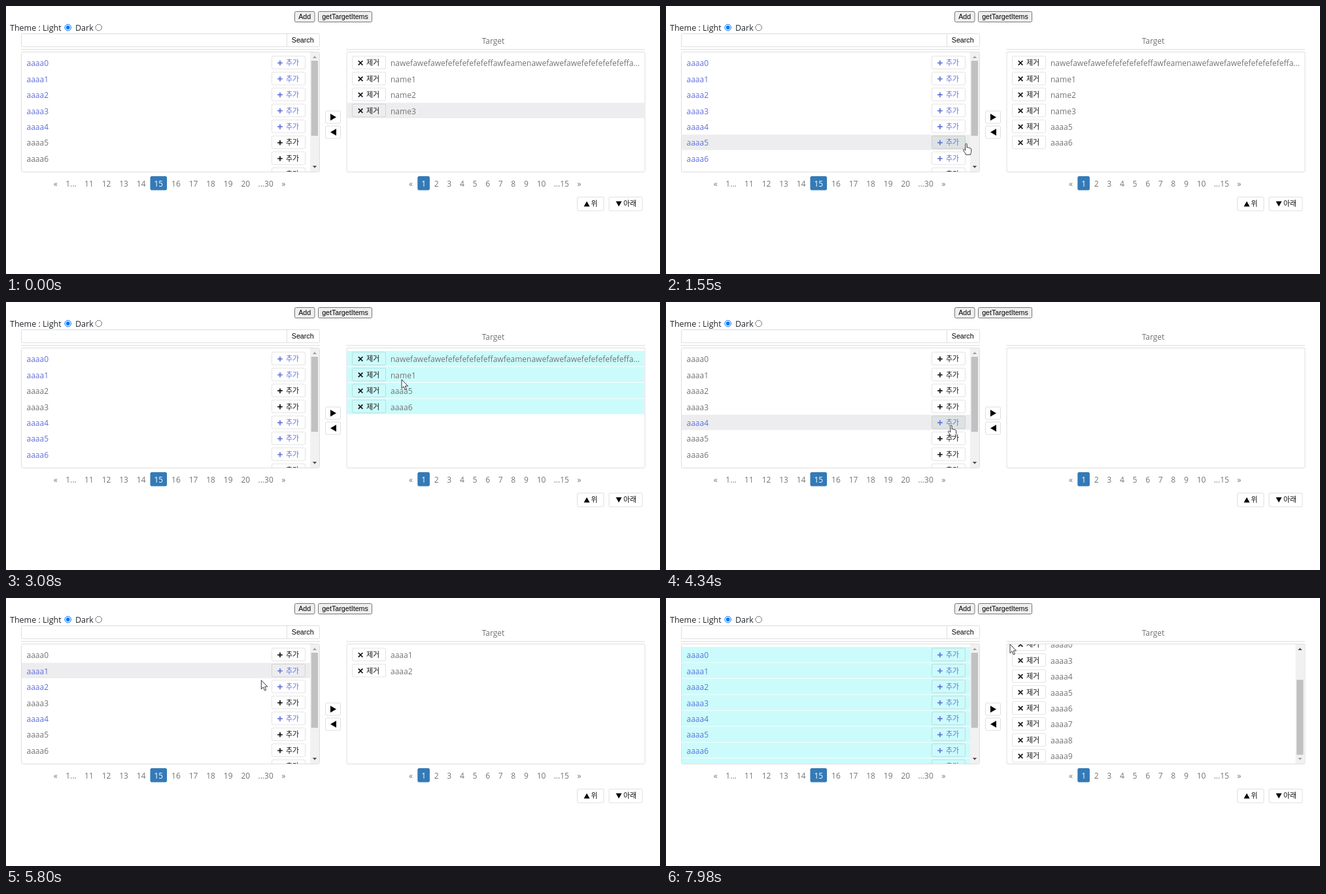
Write an HTML page that moves like this. It is 1000 px wide and 411 px high and loops after 8000 ms.

```html
<!DOCTYPE html>
<html lang="ko">
<head>
<meta charset="utf-8">
<title>Transfer list</title>
<style>
html, body { margin: 0; height: 100%; overflow: hidden; background: #fff; }
svg { display: block; }
#stage { width: 100vw; height: 100vh; }
text { font: 12px 'Open Sans', 'Noto Sans', sans-serif; fill: #747474; white-space: pre; }
.theme { font-size: 12.5px; fill: #212529; }
.ui { font: 10.7px 'Liberation Sans', Arial, sans-serif; fill: #000; }
.ko { font: 300 11px 'Noto Sans CJK KR', 'Noto Sans CJK', sans-serif; fill: #111; }
.mid { text-anchor: middle; }
.on { fill: #fff; }
.box { fill: none; stroke: #dedede; }
.icon { fill: none; stroke: #111; stroke-width: 1.7; }
.added text { fill: #6072da; }
.added .icon { stroke: #6072da; }
</style>
</head>
<body>
<svg id="stage" viewBox="0 0 1000 411">
  <g id="fixed"></g>
  <svg id="left" x="24" y="71" width="455" height="183" viewBox="24 71 455 183"></svg>
  <svg id="right" x="521" y="71" width="455" height="183" viewBox="521 71 455 183"></svg>
  <path id="cursor" fill="#fff" stroke="#222" stroke-width=".9" stroke-linejoin="round"/>
</svg>
<script>
const $ = id => document.getElementById(id);
const LOOP = 8000, GLIDE = 350, REACT = 120;
const TOP = 75, PITCH = 24.45, VISIBLE = 7.45;
const ARROW = 'M0 0v13.5l3-2.9 2.2 5.2 2.2-.9-2.1-5h4.2z';
const HAND = 'M-1.2 1.2c0-1.6 2.4-1.6 2.4 0v5c.6-.9 2.2-.6 2.3.5.7-.7 2-.4 2.2.6' +
  '.8-.5 2 0 2 1.2v4c0 1.5-1 2.3-1 4.5h-7c-.5-2-3-4.5-4-6.5-.8-1.5.9-2.3 1.9-1.2l1.2 1.3z';
const LONG = 'nawefawefawefefefefefefeffawfeamenawefawefawefefefefefefeffa...';

const upTo = n => [...Array(n).keys()];
const nameOf = id => 'aaaa' + id;

// What a click does to the lists
const add = id => s => { s.added.add(id); s.target.push({ id, name: nameOf(id) }); };
const remove = row => s => s.added.delete(s.target.splice(row, 1)[0].id);
const pick = side => s => { s.picked = side; };
const addAll = s => upTo(10).filter(id => !s.target.some(item => item.id === id)).forEach(id => add(id)(s));
const removeAll = s => { while (s.target.length) remove(0)(s); s.picked = ''; };

// Pointer stops: arrival time, x, y and the click made there
const STOPS = [
  [0, 640, 162],
  [720, 438, 206],
  [950, 438, 206, add(5)],
  [1230, 440, 231, add(6)],
  [1490, 459, 211],
  [2070, 563, 155, remove(3)],
  [2370, 563, 133, remove(2)],
  [2960, 605, 119, pick('right')],
  [3850, 498, 190, removeAll],
  [4340, 436, 189],
  [4710, 432, 108, add(1)],
  [5090, 431, 129],
  [5310, 431, 135, add(2)],
  [5820, 390, 126, pick('left')],
  [6710, 498, 172, addAll],
  [7980, 526, 71]];

function stateAt(t) {
  const names = [LONG, 'name1', 'name2', 'name3'];
  const s = { added: new Set(upTo(5)), target: names.map((name, id) => ({ id, name })), picked: '' };
  for (const [time, , , click] of STOPS) if (click && time + REACT <= t) click(s);
  return s;
}

function pointerAt(t) {
  const i = STOPS.findIndex(stop => stop[0] > t);
  if (i < 0) return STOPS.at(-1).slice(1, 3);
  const [t0, x0, y0] = STOPS[i - 1], [t1, x1, y1] = STOPS[i];
  const k = Math.max(0, 1 - (t1 - t) / Math.min(GLIDE, t1 - t0));
  const ease = k * k * (3 - 2 * k);
  return [x0 + (x1 - x0) * ease, y0 + (y1 - y0) * ease];
}

const text = (x, y, s, cls = '') => `<text x="${x}" y="${y}" class="${cls}">${s}</text>`;
const rect = (x, y, w, h, attrs) => `<rect x="${x}" y="${y}" width="${w}" height="${h}" ${attrs}/>`;
const box = (x, y, w, h) => rect(x + .5, y + .5, w, h, 'rx="2" class="box"');
const shape = (d, fill = '#000') => `<path d="${d}" fill="${fill}"/>`;

function pager(x, labels, current) {
  return labels.map(label => {
    const s = String(label), dots = s.split('.').length - 1;
    const w = 12.6 + 7 * (s.length - dots) + 2.8 * dots, on = s === current;
    x += w;
    return (on ? rect(x - w + .5, 261, w - 1, 21.5, 'rx="2.5" fill="#337ab7"') : '') +
      text(x - w / 2, 276.5, s, on ? 'mid on' : 'mid');
  }).join('');
}

function drawFixed() {
  const gray = 'rx="2" fill="#efefef" stroke="#767676"';
  const radio = (x, color) => `<circle cx="${x}" cy="33" r="4.8" fill="#fff" stroke="${color}"/>`;
  $('fixed').innerHTML =
    rect(441.5, 8.5, 30.5, 16, gray) + text(456.7, 20.3, 'Add', 'ui mid') +
    rect(477.5, 8.5, 82, 16, gray) + text(518.5, 20.3, 'getTargetItems', 'ui mid') +
    text(6, 38, 'Theme : Light', 'theme') + text(106, 38, 'Dark', 'theme') +
    radio(94.7, '#0075ff') + '<circle cx="94.7" cy="33" r="3" fill="#0075ff"/>' + radio(141.7, '#767676') +
    box(23, 42, 456, 20) + '<path d="M429.5 42v20M23 66.5h457M520 66.5h457" class="box"/>' +
    text(453.7, 56, 'Search', 'ui mid') + text(745, 57.5, 'Target', 'mid') +
    box(23, 70, 456, 184) + box(520.5, 70, 456, 184) +
    box(488, 160.5, 23, 19) + box(488, 183.5, 23, 19) +
    shape('M496 165.2l9 5.3-9 5.3zM505 188.2l-9 5.3 9 5.3z') +
    pager(66, ['«', '1...', ...upTo(10).map(i => i + 11), '...30', '»'], '15') +
    pager(609.2, ['«', ...upTo(10).map(i => i + 1), '...15', '»'], '1') +
    box(873, 292.5, 40.5, 21) + shape('M883.5 307.5h9l-4.5-8z') + text(894.5, 307.3, '위', 'ko') +
    box(921.5, 292.5, 51, 21) + shape('M932.5 299.5h9l-4.5 8z') + text(944, 307.3, '아래', 'ko');
}

function scrollbar(x, thumbY, atTop) {
  const dim = '#a3a3a3', dark = '#505050';
  return rect(x, 71, 14, 183, 'fill="#f1f1f1"') + rect(x + 1.7, thumbY, 10.3, 115, 'fill="#c1c1c1"') +
    shape(`M${x + 3.8} 80h6.4l-3.2-3.6z`, atTop ? dim : dark) +
    shape(`M${x + 3.8} 245h6.4l-3.2 3.6z`, atTop ? dark : dim);
}

const SOURCE = { x: 24, end: 465, button: 406, label: 31.5, word: 428, caption: '추가', icon: 'M415.2 87.3h7.6M419 83.5v7.6' };
const TARGET = { x: 521, end: 977, button: 529, label: 588, word: 551, caption: '제거', icon: 'M538.8 84l6.6 6.6m0-6.6l-6.6 6.6' };

const within = (v, a, b) => v >= a && v <= b;
const rowAt = y => Math.floor((y - TOP) / PITCH);

function row(side, i, name, added, picked, [x, y], scroll = 0) {
  const b = side.button;
  const hover = within(x, side.x, side.end) && rowAt(y - 6) === i;
  const pressed = hover && !picked && rowAt(y) === i && within(x, b, b + 54);
  const fill = picked ? '#ccfbfb' : hover ? '#ededef' : 'none';
  return `<g transform="translate(0 ${i * PITCH - scroll})" class="${added ? 'added' : ''}">` +
    rect(side.x, TOP, side.end - side.x, 23.6, `fill="${fill}"`) + text(side.label, 92.2, name) +
    rect(b + .5, 77, 51, 19.5, `rx="2" stroke="#000" stroke-opacity=".11" fill="${pressed ? '#dde2e3' : 'none'}"`) +
    `<path class="icon" d="${side.icon}"/>` + text(side.word, 91.2, side.caption, 'ko') + '</g>';
}

function draw(t) {
  const { added, target, picked } = stateAt(t);
  const pointer = pointerAt(t), [x, y] = pointer;
  const scroll = Math.max(0, target.length - VISIBLE) * PITCH + (target.length > VISIBLE ? 2.5 : 0);

  $('left').innerHTML = upTo(8).map(i =>
    row(SOURCE, i, nameOf(i), added.has(i), picked === 'left', pointer)).join('') + scrollbar(465, 84, true);
  $('right').innerHTML = target.map((item, i) =>
    row(TARGET, i, item.name, false, picked === 'right', pointer, scroll)).join('') +
    (scroll ? scrollbar(962.5, 125.5, false) : '');

  const onButton = y > TOP && (within(x, 404, 460) || within(x, 529, 581));
  const onArrow = within(x, 488, 512) && within(y, 160, 203);
  $('cursor').setAttribute('d', onButton || onArrow ? HAND : ARROW);
  $('cursor').setAttribute('transform', `translate(${x} ${y})`);
  $('cursor').setAttribute('visibility', t < 120 ? 'hidden' : 'visible');
}

drawFixed();
const start = performance.now();
function tick() {
  draw((performance.now() - start) % LOOP);
  requestAnimationFrame(tick);
}
tick();
</script>
</body>
</html>
```
